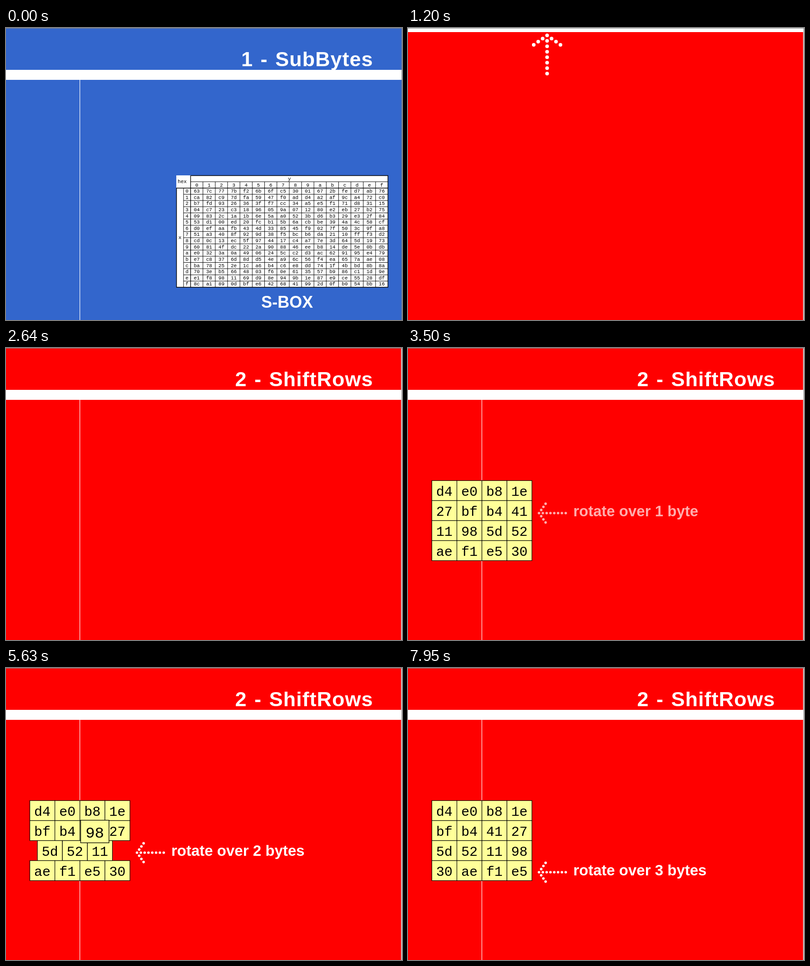
These frames come from a looping animation (872x642 px, 8000 ms). An HTML page:

```html
<!DOCTYPE html>
<html lang="en">
<head>
<meta charset="utf-8">
<title>ShiftRows</title>
<style>
  html, body { margin: 0; height: 100%; overflow: hidden; background: #f00; }
  svg { display: block; width: 100vw; height: 100vh; }
  text { font-family: "Liberation Sans", Arial, sans-serif; font-weight: bold; fill: #fff; }
  .title { font-size: 45px; letter-spacing: 1px; word-spacing: 3px; text-anchor: end; }
  .caption { font-size: 36px; text-anchor: middle; }
  .note { font-size: 33px; }
  .mono { font-family: "Liberation Mono", "Courier New", monospace; font-weight: normal; fill: #000; text-anchor: middle; }
  .small { font-size: 11px; }
  .byte { font-size: 30px; }
  .cell { fill: #ff9; stroke: #000; stroke-width: 1.2; }
</style>
</head>
<body>
<svg id="stage" viewBox="0 0 872 642"></svg>
<script>
const LOOP = 8000, TURN = 467;
const CELL_W = 55.1, CELL_H = 44, GRID_X = 52.5, GRID_Y = 291.5;
const ROWS = ["d4 e0 b8 1e", "27 bf b4 41", "11 98 5d 52", "ae f1 e5 30"];
const ROW_START = [0, 3830, 4716.6, 6383];

// The picture advances only at these moments.
const STEPS = [
  0, 150, 270, 390, 520, 650, 780, 910, 1050,
  1200, 1330, 1460, 1590, 1710, 1840, 1970, 2100,
  2250, 2380, 2510, 2640, 2760, 2900, 3040,
  3350, 3490, 3620, 3760, 3890, 4030, 4160, 4300, 4450, 4570,
  4850, 4970, 5110, 5240, 5380, 5510, 5640, 5780, 5910, 6040, 6170,
  6450, 6570, 6710, 6850, 6990, 7130, 7270, 7410, 7530, 7670, 7800, 7950
];

const stage = document.getElementById("stage");

function add(parent, tag, attrs = {}, content = "") {
  const node = document.createElementNS("http://www.w3.org/2000/svg", tag);
  for (const key in attrs) node.setAttribute(key, attrs[key]);
  node.textContent = content;
  parent.appendChild(node);
  return node;
}
const rect = (parent, x, y, width, height, fill) =>
  add(parent, "rect", { x, y, width, height, fill });
const label = (parent, x, y, cls, content) =>
  add(parent, "text", { x, y, class: cls }, content);
const move = (node, x, y, scale = 1) =>
  node.setAttribute("transform", `translate(${x} ${y}) scale(${scale})`);
const show = (node, on) => node.setAttribute("display", on ? "inline" : "none");
const clamp = (v, lo, hi) => Math.min(hi, Math.max(lo, v));
const ramp = (t, from, to) => clamp((t - from) / (to - from), 0, 1);

// Dotted arrow pointing up, with its tip at the origin.
function dottedArrow(parent, transform) {
  const g = add(parent, "g", { transform, fill: "#fff" });
  const dot = (cx, cy) => add(g, "circle", { cx, cy, r: 4 });
  for (let i = 0; i < 8; i++) dot(0, 12 * i);
  for (let i = 1; i < 4; i++) {
    dot(-9.8 * i, 6.9 * i);
    dot(9.8 * i, 6.9 * i);
  }
  return g;
}

function aesSbox() {
  const box = [0x63];
  const rotl = (v, n) => ((v << n) | (v >> (8 - n))) & 255;
  let p = 1, q = 1;
  do {
    p = (p ^ (p << 1) ^ (p & 128 ? 0x11b : 0)) & 255;
    q ^= q << 1;
    q ^= q << 2;
    q ^= q << 4;
    q &= 255;
    if (q & 128) q ^= 9;
    box[p] = q ^ rotl(q, 1) ^ rotl(q, 2) ^ rotl(q, 3) ^ rotl(q, 4) ^ 0x63;
  } while (p !== 1);
  return box;
}

function buildTable(parent) {
  const left = 406.5, top = 352, right = 841, bottom = 570;
  const w = (right - left) / 16, h = (bottom - top) / 16;
  const put = (x, y, s) => label(parent, x, y, "mono small", s);
  rect(parent, 375, 324, 466, 246, "#fff");
  let d = `M${left} 338H${right}M391 ${top}V${bottom}`;
  for (let i = 1; i < 16; i++) {
    d += `M${left + i * w} 338V${bottom}M391 ${top + i * h}H${right}`;
  }
  add(parent, "path", { d, stroke: "#000", "stroke-width": 1 });
  add(parent, "path", {
    d: `M${left} 324.5H${right}V${bottom}H375.5V${top}H${right}M${left} 324.5V${bottom}`,
    fill: "none", stroke: "#000", "stroke-width": 1.4
  });
  put(388, 341, "hex");
  put(624, 335, "y");
  put(383, 464, "x");
  for (let i = 0; i < 16; i++) {
    put(left + (i + 0.5) * w, 348.5, i.toString(16));
    put(398.5, top + i * h + 10, i.toString(16));
  }
  aesSbox().forEach((v, i) => put(
    left + (i % 16 + 0.5) * w,
    top + Math.floor(i / 16) * h + 10,
    v.toString(16).padStart(2, "0")
  ));
}

// First slide
const first = add(stage, "g");
rect(first, 0, 0, 872, 642, "#36c");
rect(first, 0, 92, 871, 22, "#fff");
rect(first, 162, 114, 1.2, 528, "#fff");
label(first, 808.5, 84, "title", "1 - SubBytes");
buildTable(first);
label(first, 619, 615, "caption", "S-BOX");

// Second slide
const second = add(stage, "g");
const backdrop = rect(second, 0, 0, 872, 642, "#f00");
const wipe = add(second, "g");
rect(wipe, 0, 22, 872, 700, "#f00");
rect(wipe, 0, 0, 872, 22, "#fff");
const upArrow = dottedArrow(wipe, "translate(306.3 29.3)");
const divider = rect(second, 162, 114, 1.2, 528, "#fff");
const title = label(second, 808.5, 84, "title", "2 - ShiftRows");

const note = add(second, "g");
dottedArrow(note, "translate(288.5 363) rotate(-90) scale(.7)");
const noteText = label(note, 364, 370, "note", "");

const matrix = add(second, "g");
const cells = ROWS.map(row => row.split(" ").map(value => {
  const g = add(matrix, "g");
  add(g, "rect", {
    x: -CELL_W / 2, y: -CELL_H / 2, width: CELL_W, height: CELL_H, class: "cell"
  });
  label(g, 0, 11.5, "mono byte", value);
  return g;
}));
rect(second, 870, 0, 1, 642, "#fff");

rect(stage, 0, 0, 872, 1, "#888");
rect(stage, 871, 0, 1, 642, "#888");

function bandY(t) {
  if (t >= 2250) return 92;
  return t < 1184
    ? -22 + 664 * Math.exp(-0.00468 * (t - 150))
    : 92 - 114 * Math.exp(-0.005 * (t - 1184));
}

function placeRow(row, r, t) {
  const turns = clamp((t - ROW_START[r]) / TURN, 0, r);
  const done = Math.floor(turns), p = turns - done;
  row.forEach((cell, i) => {
    const slot = (i - done + 4) % 4;
    const flying = p > 0 && slot === 0;
    const lift = flying ? 54 * Math.sin(Math.PI * p) ** 1.2 : 0;
    const col = flying ? 3 * p : slot - p;
    move(cell,
      GRID_X + (col + 0.5) * CELL_W,
      GRID_Y + (r + 0.5) * CELL_H - lift,
      1 + lift * 0.0031);
    if (flying) matrix.appendChild(cell);
  });
}

function render(t) {
  show(first, t < 150);
  show(second, t >= 150);

  backdrop.setAttribute("fill", t < 1184 ? "#06c" : "#f00");
  move(wipe, 0, Math.round(bandY(t)));
  show(upArrow, t < 2250);

  show(divider, t >= 2250);
  divider.setAttribute("height", 528 * ramp(t, 2120, 2510));
  show(title, t >= 2250);
  move(title, 367 * (1 - ramp(t, 2200, 2640)) ** 3, 0);

  matrix.setAttribute("opacity", ramp(t, 2640, 3040));
  cells.forEach((row, r) => placeRow(row, r, t));

  const count = t < 4450 ? 1 : t < 5780 ? 2 : 3;
  noteText.textContent = `rotate over ${count} byte${count > 1 ? "s" : ""}`;
  note.setAttribute("opacity", ramp(t, 3220, 3620));
  move(note, 0, 43 * (ramp(t, 4330, 4570) + ramp(t, 5665, 6170)));
}

const began = performance.now();
let shown = -1;
function tick() {
  const t = (performance.now() - began) % LOOP;
  const step = STEPS.findLast(s => s <= t);
  if (step !== shown) render(shown = step);
  requestAnimationFrame(tick);
}
tick();
</script>
</body>
</html>
```
